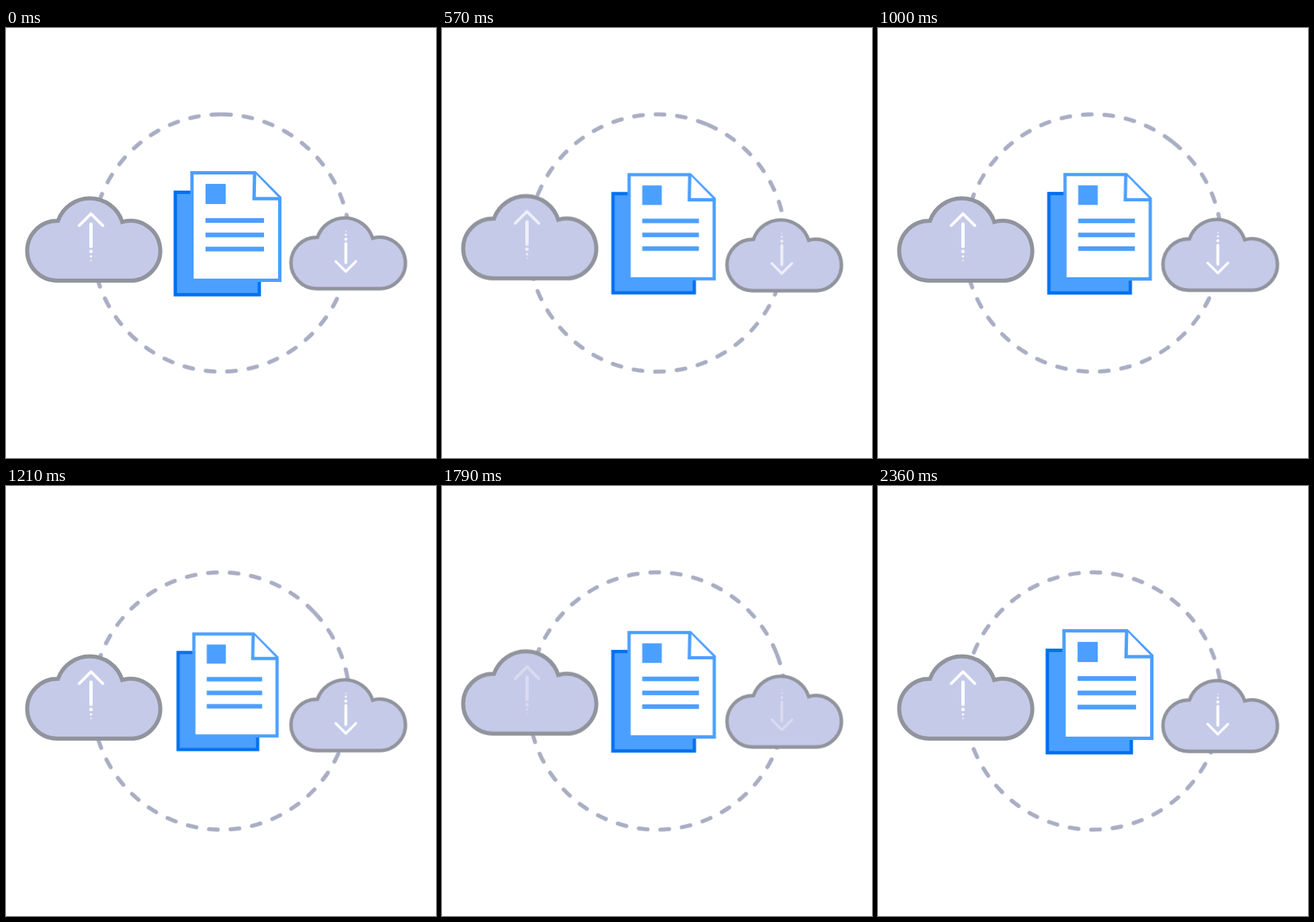
Write an HTML page without scripts that moves like this. It is 640x640 px and loops after 2.43 s.

```html
<!DOCTYPE html>
<html lang="en">
<head>
<meta charset="utf-8">
<title>Cloud file exchange</title>
<style>
  html, body { margin: 0; height: 100%; overflow: hidden; background: #fff; }
  svg { display: block; width: 100%; height: 100%; }

  .ring, .docs, .up, .down, .arrow { animation: 2430ms infinite; }

  .ring {
    fill: none; stroke: #a9aec4; stroke-width: 6; stroke-linecap: round;
    stroke-dasharray: 13 19.08;
    transform-origin: 320px 320px;
    animation-name: spin;
    animation-delay: -5ms;
  }
  .docs {
    transform-origin: 330px 306.5px;
    animation-name: pulse;
  }
  .up { animation-name: rise; }
  .down { animation-name: sink; }
  .docs, .up, .down { animation-timing-function: cubic-bezier(.37, 0, .63, 1); }
  .arrow { animation-name: fade; animation-timing-function: linear; }

  .cloud { fill: #c5cae9; stroke: #91949d; stroke-width: 6; }
  .line { fill: none; stroke: #fff; stroke-linecap: round; stroke-linejoin: round; }
  .back { fill: #4b9fff; stroke: #0070ef; stroke-width: 5; }
  .page { fill: #fff; stroke: #4b9fff; stroke-width: 5; }
  .ink { fill: #4b9fff; }

  /* The ring turns in discrete ticks, 14 per second. */
  @keyframes spin {
    0%    { transform: rotate(0deg); animation-timing-function: steps(4); }
    11.8% { transform: rotate(12deg); animation-timing-function: steps(4); }
    23.5% { transform: rotate(22.8deg); animation-timing-function: steps(6); }
    41.2% { transform: rotate(38.1deg); animation-timing-function: steps(6); }
    58.8% { transform: rotate(54.9deg); animation-timing-function: steps(5); }
    73.6% { transform: rotate(68.5deg); animation-timing-function: steps(8); }
    97.1% { transform: rotate(90deg); animation-timing-function: steps(1); }
    100%  { transform: rotate(92.7deg); }
  }
  @keyframes pulse {
    0%, 32.5%, 65%, 97.5%, 100% { transform: scale(1); }
    16.3%, 48.8%, 81.3% { transform: scale(.947); }
  }
  @keyframes rise {
    0%, 31.3%, 56.8%, 88.1%, 100% { transform: translateY(0); }
    14%, 70.8% { transform: translateY(-8px); }
  }
  @keyframes sink {
    0%, 31.3%, 70.8% { transform: translateY(0); }
    14%, 56.8%, 88.1%, 100% { transform: translateY(7px); }
  }
  @keyframes fade {
    0%, 28.4%, 56.8%, 85.2%, 100% { opacity: 1; }
    12.8%, 69.6% { opacity: .1; }
  }
</style>
</head>
<body>
<svg viewBox="0 0 640 640">
  <defs>
    <path id="cloud" class="cloud" d="M76 376A44.5 44.5 0 0 1 76 287L77.3 287A50.5 50.5 0 0 1 173 288.7A44.5 44.5 0 1 1 184 376Z"/>
    <g id="arrow">
      <path class="line" stroke-width="4.3" d="M109 294L126.5 276.5L144 294"/>
      <path class="line" stroke-width="5" d="M126.5 292V325"/>
      <g fill="#fff">
        <circle cx="126.5" cy="332.5" r="2.6"/>
        <circle cx="126.5" cy="340" r="1.8"/>
        <circle cx="126.5" cy="346" r="1"/>
      </g>
    </g>
  </defs>

  <g class="ring">
    <circle cx="320" cy="320" r="191.5" transform="rotate(-89.5 320 320)"/>
  </g>

  <g class="docs">
    <rect class="back" x="252" y="244.5" width="125" height="152.5"/>
    <path class="page" d="M276.8 215.5H370.5L407.5 252.5V375.5H276.8Z"/>
    <path class="page" d="M370 215.5L369.2 254H407.5"/>
    <g class="ink">
      <rect x="297" y="232" width="30" height="30"/>
      <rect x="297" y="283" width="87" height="7"/>
      <rect x="297" y="304.5" width="87" height="7"/>
      <rect x="297" y="325.5" width="87" height="7"/>
    </g>
  </g>

  <g class="up">
    <use href="#cloud"/>
    <g class="arrow"><use href="#arrow"/></g>
  </g>

  <g class="down">
    <use href="#cloud" transform="translate(397 64.6) scale(.86)"/>
    <g class="arrow"><use href="#arrow" transform="translate(397 600.3) scale(.86 -.86)"/></g>
  </g>
</svg>
</body>
</html>
```
